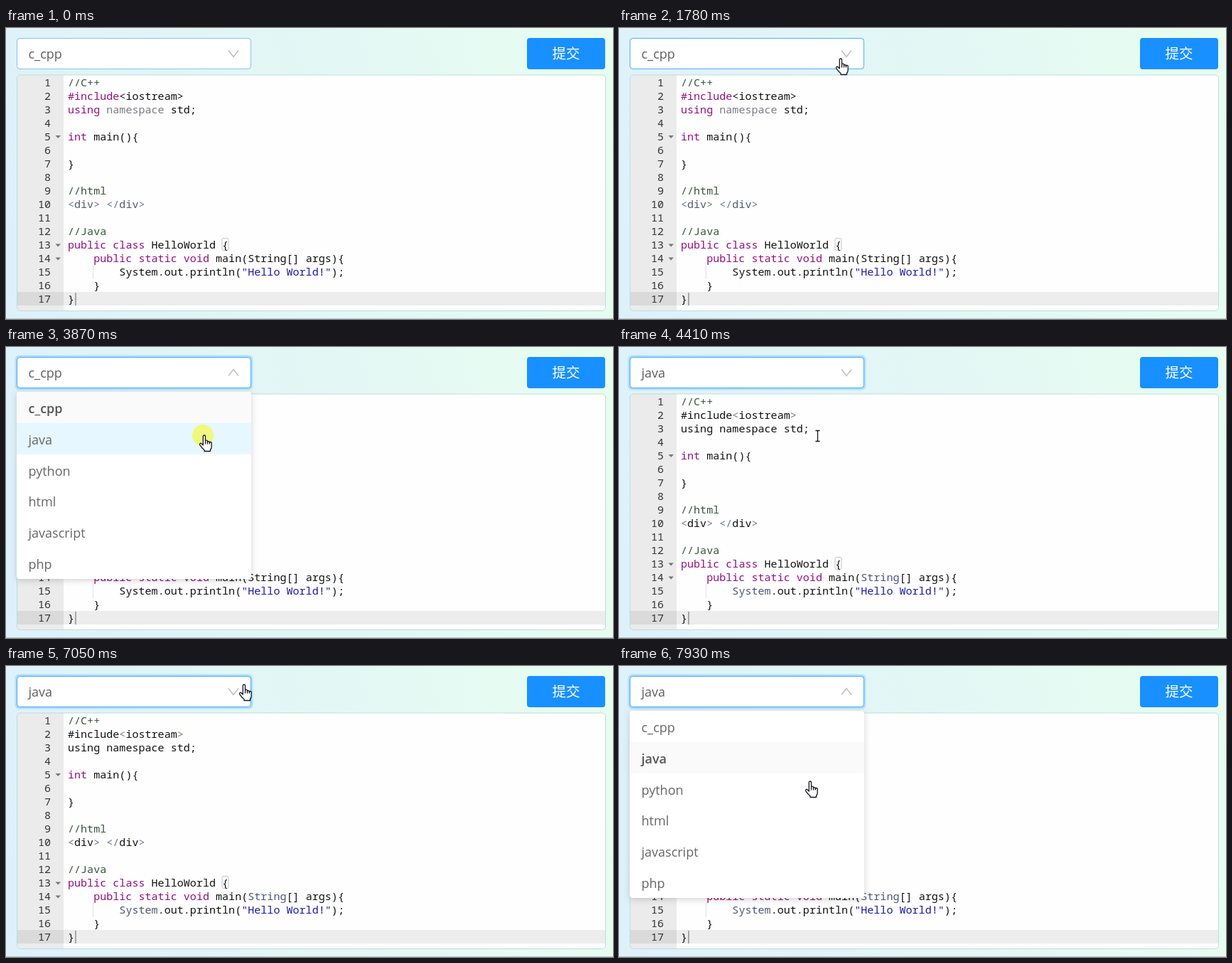
An HTML page with a canvas that plays this animation: 854x409 px, repeating every 8 s.

```html
<!DOCTYPE html>
<html lang="en">
<head>
<meta charset="utf-8">
<title>Code editor language picker</title>
<style>
  html, body { margin: 0; width: 100%; height: 100%; overflow: hidden; }
  canvas { display: block; }
</style>
</head>
<body>
<canvas id="stage" width="854" height="409"></canvas>
<script>
const ctx = document.getElementById('stage').getContext('2d');
const LOOP = 8000;
const UI_FONT = '"Open Sans", "Noto Sans", sans-serif';
const CODE_FONT = '15.07px "Noto Sans Mono", "DejaVu Sans Mono", monospace';
const CHAR = 9.045, LINE = 19.04, ROW = 43.85;
const MENU = { x: 15, y: 63, w: 330, h: 263 };
const OPTIONS = ['c_cpp', 'java', 'python', 'html', 'javascript', 'php'];
const CODE = `//C++
#include<iostream>
using namespace std;

int main(){

}

//html
<div> </div>

//Java
public class HelloWorld {
    public static void main(String[] args){
        System.out.println("Hello World!");
    }
}`.split('\n');

const KEYWORDS = ['int', 'public', 'class', 'static', 'void'];
const CPP_COLORS = { '#include': '#930f80', using: '#930f80', namespace: '#7d7884', div: '#4d5b74' };
const JAVA_COLORS = { System: '#4c5478', String: '#4c5478' };

// Each move: start, end, step count, path from and to; the pointer holds between steps.
const MOVES = [
  { start: 440, end: 590, steps: 3, from: [746, 386], to: [507, 13], enters: true },
  { start: 1220, end: 1780, steps: 8, from: [418, 1], to: [310, 43], enters: true },
  { start: 2920, end: 3480, steps: 8, from: [310, 43], to: [277, 124] },
  { start: 5420, end: 6200, steps: 11, from: [277, 124], to: [334, 31] },
  { start: 6280, end: 6360, steps: 2, from: [334, 31], to: [334, 26] },
  { start: 6510, end: 6590, steps: 2, from: [334, 26], to: [333, 26] },
  { start: 7610, end: 7930, steps: 5, from: [333, 26], to: [267, 162] }
];
const CLICKS = [[2230, 2370], [3870, 4030], [6900, 7050]];

const HAND = new Path2D('M.3 14V1.6a1.6 1.6 0 0 1 3.2 0V8.6a1.5 1.5 0 0 1 3 .2V9.6a1.5 1.5 0 0 1 2.9.2V10.8a1.4 1.4 0 0 1 2.8.2V16Q12.200 18.500 10.500 20.500V22.500H2V20.800Q-1.500 18-4.300 13.600C-5.200 11.500-3 10.600-1.800 12Z');
const ARROW = new Path2D('M0 0V17L4 13.200 6.600 19.300 9.200 18.200 6.600 12.200H12Z');

const clamp = v => Math.max(0, Math.min(1, v));
const ramp = (t, a, b) => clamp((t - a) / (b - a));
const smooth = v => v * v * (3 - 2 * v);
const easeOut = v => 1 - (1 - v) ** 3;

function box(x, y, w, h, r, fill, stroke, alpha = 1) {
  ctx.save();
  ctx.globalAlpha *= alpha;
  ctx.beginPath();
  ctx.roundRect(x, y, w, h, r);
  if (fill) { ctx.fillStyle = fill; ctx.fill(); }
  if (stroke) { ctx.strokeStyle = stroke; ctx.stroke(); }
  ctx.restore();
}

function label(text, x, y, font, color, align = 'left') {
  ctx.font = font;
  ctx.fillStyle = color;
  ctx.textAlign = align;
  ctx.fillText(text, x, y);
}

function background() {
  const g = ctx.createLinearGradient(0, 260, 854, 60);
  g.addColorStop(0, '#def1fb');
  g.addColorStop(.5, '#e2f7f5');
  g.addColorStop(1, '#e8fdf0');
  ctx.fillStyle = g;
  ctx.fillRect(0, 0, 854, 409);
  ctx.fillStyle = '#b3c5ca';
  ctx.fillRect(0, 408, 854, 1);
}

function tokenColor(token, java) {
  if (token.startsWith('//')) return '#34563a';
  if (token[0] === '"') return '#1a1aa6';
  if (KEYWORDS.includes(token)) return '#930f80';
  if ('<>/'.includes(token)) return '#687687';
  return (java ? JAVA_COLORS : CPP_COLORS)[token] || '#111';
}

function editor(java) {
  box(15.5, 66, 828, 331.5, 5, '#fefefe', null);
  ctx.save();
  ctx.beginPath();
  ctx.roundRect(15.5, 66, 828, 331.5, 5);
  ctx.clip();
  ctx.fillStyle = '#ebebeb';
  ctx.fillRect(16, 66, 65, 332);
  ctx.fillStyle = '#dadada';
  ctx.fillRect(16, 371, 65, 19);
  ctx.fillStyle = '#ededed';
  ctx.fillRect(81, 371, 762, 19);
  ctx.restore();
  box(15.5, 66, 828, 331.5, 5, null, '#bcdcdd');

  box(304, 295.5, 9, 17, 2, null, '#c4c4c4');
  ctx.fillStyle = '#c6c6c6';
  for (let y = 333; y < 352; y += 2) ctx.fillRect(122, y, 1, 1);
  ctx.fillStyle = '#a5a9a5';
  ctx.fillRect(97, 372, 2, 18);

  CODE.forEach((line, i) => {
    const y = 81.7 + i * LINE;
    label(i + 1, 63, y, CODE_FONT, '#333', 'right');
    if (/{$/.test(line)) {
      ctx.fillStyle = '#777';
      ctx.beginPath();
      ctx.moveTo(69.5, y - 6.800);
      ctx.lineTo(77, y - 6.800);
      ctx.lineTo(73.2, y - 2.800);
      ctx.fill();
    }
    for (const m of line.matchAll(/\/\/.*|"[^"]*"|#?\w+|\S/g)) {
      const header = !java && i === 1 && '<>'.includes(m[0]);
      label(m[0], 87 + m.index * CHAR, y, CODE_FONT, header ? '#111' : tokenColor(m[0], java));
    }
  });
}

function submitButton() {
  box(733, 14, 110, 44, 4, '#1890ff');
  label('提交', 788, 43, '19.5px "Noto Sans CJK SC", "Noto Sans CJK", sans-serif', '#fff', 'center');
}

function selectBox(value, hover, focus, turn) {
  box(12.5, 11.5, 335, 49, 6, '#1890ff', null, .22 * focus);
  box(15.5, 14.5, 329, 43, 4, '#fff', '#d9d9d9');
  box(15.5, 14.5, 329, 43, 4, null, '#40a9ff', hover);
  label(value, 31.5, 42.500, '18px ' + UI_FONT, '#5e5e5e');
  ctx.save();
  ctx.translate(320, 36);
  ctx.rotate(turn * Math.PI);
  ctx.strokeStyle = '#bfbfbf';
  ctx.lineWidth = 1.5;
  ctx.beginPath();
  ctx.moveTo(-7, -4.5);
  ctx.lineTo(0, 4.500);
  ctx.lineTo(7, -4.5);
  ctx.stroke();
  ctx.restore();
}

function menu(open, value, highlight) {
  if (open <= 0) return;
  const { x, y, w, h } = MENU;
  ctx.save();
  ctx.globalAlpha = open;
  ctx.translate(0, y);
  ctx.scale(1, .8 + .2 * open);
  ctx.save();
  ctx.shadowColor = 'rgba(0,0,0,.17)';
  ctx.shadowBlur = 9;
  ctx.shadowOffsetY = 2;
  box(x, 0, w, h, 4, '#fff');
  ctx.restore();
  OPTIONS.forEach((name, i) => {
    const chosen = name === value;
    if (chosen) box(x, i * ROW, w, ROW, i ? 0 : [4, 4, 0, 0], '#fafafa');
    if (i === 1) box(x, ROW, w, ROW, 0, '#e6f7ff', null, highlight);
    label(name, 31.5, i * ROW + 29.800, (chosen ? '600 ' : '') + '18px ' + UI_FONT, chosen ? '#555' : '#666');
  });
  ctx.restore();
}

function pointerAt(t) {
  if (t < 440 || (t >= 670 && t < 1220)) return null;
  const move = MOVES.findLast(m => t >= m.start);
  const { start, end, steps, from, to, enters } = move;
  const step = Math.min(steps - 1, Math.floor((t - start) / (end - start) * (steps - 1) + .02));
  const p = smooth(enters ? step / (steps - 1) : (step + 1) / steps);
  return from.map((v, i) => Math.round(v + (to[i] - v) * p));
}

function pointer(t, menuOpen) {
  const at = pointerAt(t);
  if (!at) return;
  const [x, y] = at;
  const inColumn = x >= 15 && x < 345;
  const overSelect = inColumn && y >= 14 && y < 58;
  const overMenu = menuOpen && inColumn && y >= MENU.y && y < MENU.y + MENU.h;
  ctx.save();
  ctx.translate(x, y);
  if (CLICKS.some(([a, b]) => t >= a && t < b)) {
    ctx.fillStyle = 'rgba(244,249,70,.7)';
    ctx.beginPath();
    ctx.arc(0, 0, 15, 0, 7);
    ctx.fill();
  }
  ctx.lineWidth = 1.3;
  ctx.lineJoin = 'round';
  ctx.strokeStyle = '#15151f';
  ctx.fillStyle = '#fff';
  if (!overSelect && !overMenu && y >= 66) {
    ctx.beginPath();
    ctx.moveTo(-.5, -6.5);
    ctx.lineTo(5.5, -6.5);
    ctx.moveTo(2.5, -6.5);
    ctx.lineTo(2.5, 8.5);
    ctx.moveTo(-.5, 8.5);
    ctx.lineTo(5.5, 8.5);
    ctx.stroke();
  } else {
    const shape = overSelect || overMenu ? HAND : ARROW;
    ctx.fill(shape);
    ctx.stroke(shape);
    if (shape === HAND) {
      ctx.beginPath();
      for (const fx of [3.5, 6.5, 9.4]) {
        ctx.moveTo(fx, 9);
        ctx.lineTo(fx, 12.500);
      }
      ctx.stroke();
    }
  }
  ctx.restore();
}

function draw(now) {
  const t = now % LOOP;
  const held = Math.floor((t + 30) / 80) * 80 - 30; // screen updates about every 80 ms
  const secondOpen = t >= 7050;
  const value = t < 4030 ? 'c_cpp' : 'java';
  const opening = secondOpen ? ramp(held, 7120, 7360) : ramp(held, 2370, 2610);
  const closing = secondOpen ? 0 : ramp(held, 4000, 4240);
  const turn = secondOpen ? ramp(held, 7120, 7430) : ramp(held, 2370, 2690) - ramp(held, 4000, 4400);
  const open = easeOut(opening) * (1 - closing ** 2);
  const hover = t < 70 ? .5 : ramp(held, 1480, 1760);

  ctx.textBaseline = 'alphabetic';
  ctx.lineWidth = 1;
  background();
  submitButton();
  editor(t >= 4110);
  selectBox(value, hover, ramp(held, 2340, 2640), smooth(clamp(turn)));
  menu(open, value, secondOpen ? 0 : ramp(held, 3240, 3540));
  pointer(t, open > 0 && closing === 0);
}

function tick() {
  draw(performance.now());
  requestAnimationFrame(tick);
}
tick();
</script>
</body>
</html>
```
